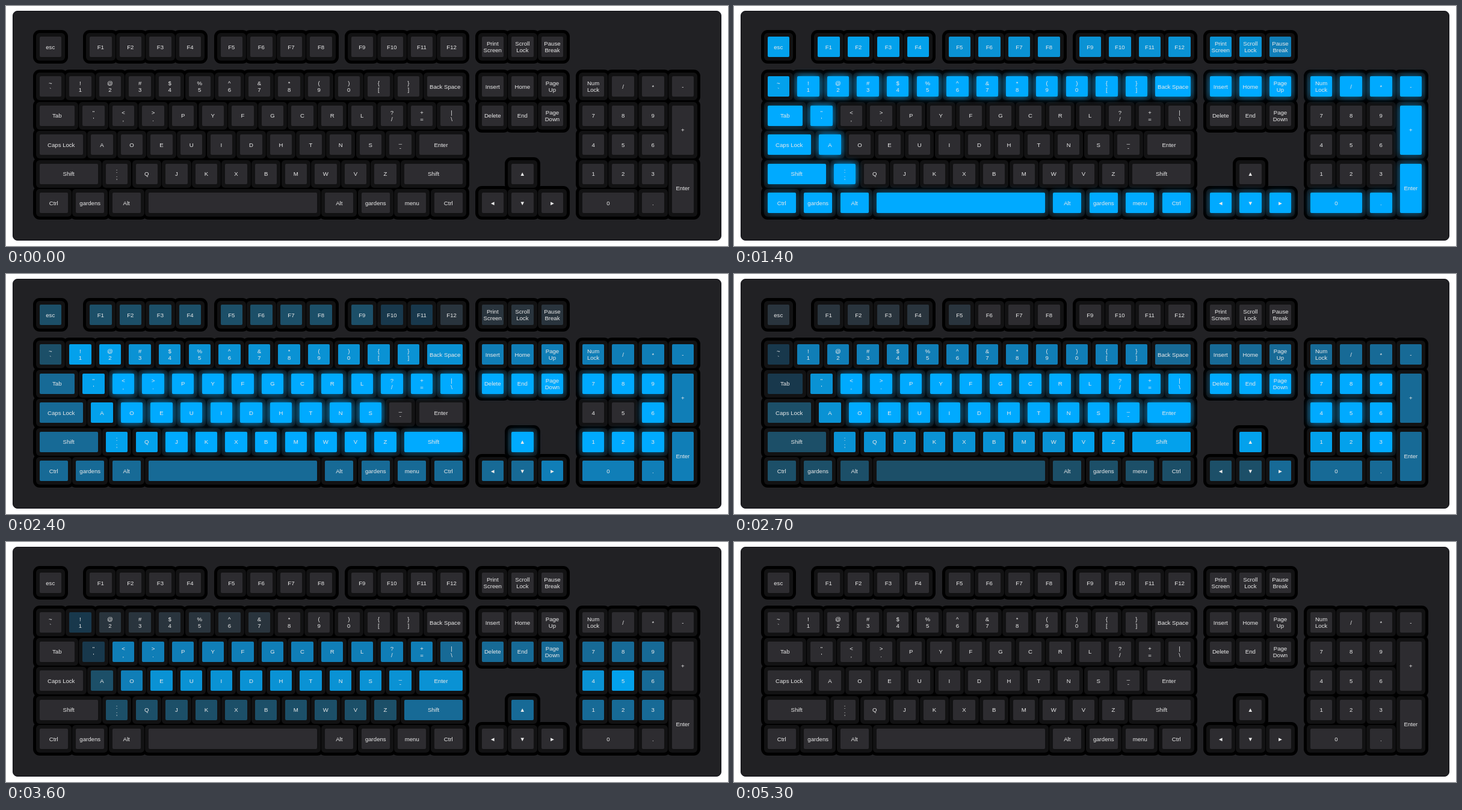
An HTML page that plays this animation: 1200 by 400 pixels, repeating every 5.4 s.

```html
<!DOCTYPE html>
<html lang="en">
<head>
<meta charset="utf-8">
<title>Keyboard spiral</title>
<style>
  html, body { margin: 0; width: 100%; height: 100%; overflow: hidden; background: #fff; }
  #board { position: absolute; left: 0; top: 0; width: 1200px; height: 400px; overflow: hidden; }
  #board div { position: absolute; box-sizing: border-box; }
  #board .case { background: #212124; border: 1px solid #0b0b12; border-radius: 8px; }
  #board .rim { background: #000; border-radius: 11px; }
  #board .bezel { background: #121213; border-radius: 6px; }
  #board .cap {
    display: flex; align-items: center; justify-content: center;
    border-radius: 2px; background: #2d2c30; color: #eaeaea;
    font: 9.6px/11px "Liberation Sans", Arial, sans-serif;
    text-align: center; white-space: pre;
  }
</style>
</head>
<body>
<div id="board"></div>
<script>
const LOOP = 5400, TICK = 100;
const KEY_DELAY = 24, FIRST = 16, HOLD = 985;
const CAP_W = 36.5, CAP_H = 34.2, GAP = 13.1, ROW = 48.5;
const MAIN_X = 55.5, NAV_X = 790.5, PAD_X = 957.8;
const OFF = '#2d2c30';

// Cap colour until the given age in ms
const FADE = [
  [HOLD, '#00aaff'], [1125, '#03a1ec'], [1378, '#0a92d4'], [1666, '#107eb7'],
  [1982, '#176a96'], [2256, '#1c4f68'], [2304, '#18384c'], [2448, '#29343d']
];

const board = document.getElementById('board');
const keys = [];

function box(cls, x, y, w, h, text = '') {
  const el = document.createElement('div');
  el.className = cls;
  el.style.cssText = `left:${x}px;top:${y}px;width:${w}px;height:${h}px`;
  el.textContent = text;
  board.append(el);
  return el;
}

// A key is a label or [label, width, height]
function run(x, y, list) {
  for (const item of list) {
    const [label, w = CAP_W, h = CAP_H] = [].concat(item);
    keys.push({ label, x, y, w, h });
    x += w + GAP;
  }
}

const rowY = n => 117 + n * ROW;
const pairs = s => s.split(' ').map(p => p[0] + '\n' + p[1]);
const TALL = CAP_H + ROW, MOD = 47.4, SHIFT = 97.3, LOCK = 72.5;

run(MAIN_X, 51, ['esc']);
run(139, 51, ['F1', 'F2', 'F3', 'F4']);
run(356.5, 51, ['F5', 'F6', 'F7', 'F8']);
run(573.5, 51, ['F9', 'F10', 'F11', 'F12']);
run(NAV_X, 51, ['Print\nScreen', 'Scroll\nLock', 'Pause\nBreak']);

run(MAIN_X, rowY(0), [...pairs('~` !1 @2 #3 $4 %5 ^6 &7 *8 (9 )0 {[ }]'), ['Back Space', 58.7]]);
run(NAV_X, rowY(0), ['Insert', 'Home', 'Page\nUp']);
run(PAD_X, rowY(0), ['Num\nLock', '/', '*', '-']);

run(MAIN_X, rowY(1), [['Tab', 58.5], ...pairs('"\' <, >.'), ...'PYFGCRL', ...pairs('?/ += |\\')]);
run(NAV_X, rowY(1), ['Delete', 'End', 'Page\nDown']);
run(PAD_X, rowY(1), ['7', '8', '9', ['+', CAP_W, TALL]]);

run(MAIN_X, rowY(2), [['Caps Lock', LOCK], ...'AOEUIDHTNS', '_\n-', ['Enter', LOCK]]);
run(PAD_X, rowY(2), ['4', '5', '6']);

run(MAIN_X, rowY(3), [['Shift', SHIFT], ':\n;', ...'QJKXBMWVZ', ['Shift', SHIFT]]);
run(NAV_X + CAP_W + GAP, rowY(3), ['▲']);
run(PAD_X, rowY(3), ['1', '2', '3', ['Enter', CAP_W, TALL]]);

run(MAIN_X, rowY(4), [
  ['Ctrl', MOD], ['gardens', MOD], ['Alt', MOD], ['', 280],
  ['Alt', MOD], ['gardens', MOD], ['menu', MOD], ['Ctrl', MOD]
]);
run(NAV_X, rowY(4), ['◄', '▼', '►']);
run(PAD_X, rowY(4), [['0', CAP_W * 2 + GAP], '.']);

// Inward spiral as index ranges, starting at the top right
const SPIRAL = [
  [15, 0], [16, 16], [37, 37], [58, 58], [74, 74], [91, 103], [90, 90], [57, 57],
  [36, 17], [38, 38], [59, 59], [75, 75], [76, 89], [73, 73], [56, 39], [60, 72]
];
let order = 0;
for (const [from, to] of SPIRAL) {
  const dir = to < from ? -1 : 1;
  for (let i = from; i !== to + dir; i += dir) keys[i].start = FIRST + KEY_DELAY * order++;
}

box('case', 11, 8, 1178, 383);
for (const [cls, pad] of [['rim', 11], ['bezel', 6]]) {
  for (const k of keys) box(cls, k.x - pad, k.y - pad, k.w + 2 * pad, k.h + 2 * pad);
}
for (const k of keys) k.el = box('cap', k.x, k.y, k.w, k.h, k.label);

function paint(t) {
  for (const k of keys) {
    const age = t - k.start;
    const step = age >= 0 && FADE.find(([until]) => age < until);
    const glow = 0.85 - 0.5 * age / HOLD;
    k.el.style.background = step ? step[1] : OFF;
    k.el.style.boxShadow = age >= 0 && age < HOLD
      ? `0 0 12px 1px rgba(0,170,255,${glow.toFixed(3)})`
      : 'none';
  }
}

const origin = performance.now();
let shown = -1;
function frame() {
  const t = Math.floor(((performance.now() - origin) % LOOP) / TICK) * TICK;
  if (t !== shown) paint(shown = t);
  requestAnimationFrame(frame);
}
frame();
</script>
</body>
</html>
```
